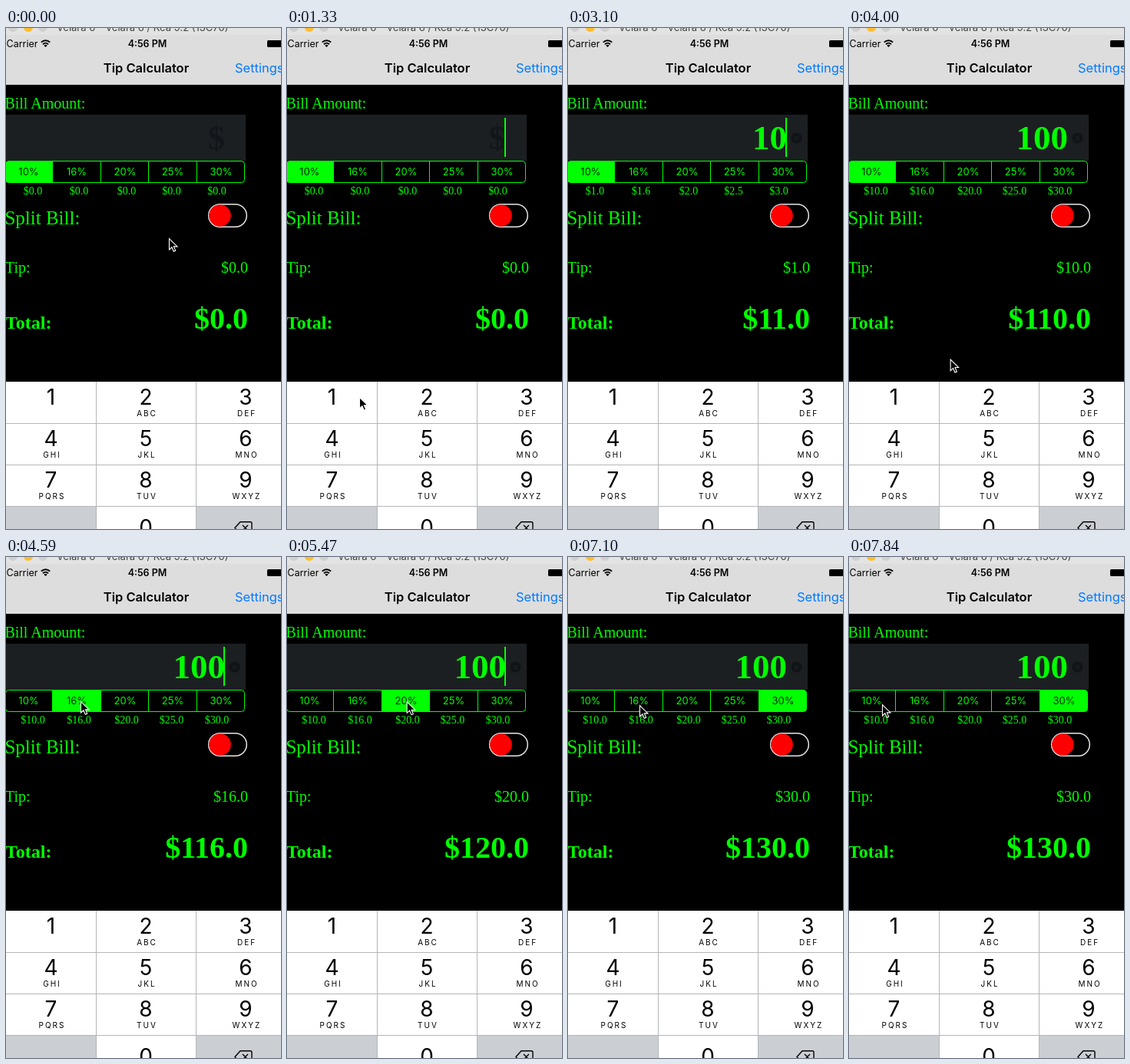
Animation of 358x653 px, one loop 7.99 s. Source, as an HTML page:

```html
<!DOCTYPE html>
<html lang="en">
<head>
<meta charset="utf-8">
<title>Tip Calculator</title>
<style>
  html, body { margin: 0; width: 358px; height: 653px; overflow: hidden; background: #000; }
  svg { display: block; }
  text { font-family: Inter, Roboto, sans-serif; }
  .serif { font-family: "Liberation Serif", "Times New Roman", serif; fill: #0f0; }
  .bold { font-weight: 700; }
  .semi { font-weight: 600; }
  .mid { text-anchor: middle; }
  .end { text-anchor: end; }
  .sub { letter-spacing: 2px; }
</style>
</head>
<body>
<svg id="stage" width="358" height="653" viewBox="0 0 358 653">
  <rect width="358" height="74" fill="#dddddd"/>
  <rect width="358" height="9" fill="#e3e3e3"/>
  <circle cx="9" cy="-1" r="6" fill="#cfcfcf"/>
  <circle cx="29" cy="-1" r="6" fill="#fdbd2f"/>
  <circle cx="48" cy="-1" r="6" fill="#cfcfcf"/>
  <text x="66" y="4" font-size="13" fill="#444">Velara 6 - Velara 6 / Kea 9.2 (13C70)</text>

  <text x="0.5" y="25" font-size="12.5">Carrier</text>
  <g fill="none" stroke="#000" stroke-width="1.9">
    <path d="M45.8 18.6A8 8 0 0 1 57.2 18.6"/>
    <path d="M48 21.2A5 5 0 0 1 55 21.2"/>
  </g>
  <path d="M51.5 25L49.3 22.8A3.2 3.2 0 0 1 53.7 22.8Z"/>
  <text class="semi mid" x="184" y="25" font-size="12.5">4:56 PM</text>
  <rect x="340" y="16" width="22" height="9" rx="1.5"/>
  <text class="semi mid" x="182.5" y="58" font-size="16.5">Tip Calculator</text>
  <text x="298" y="58" font-size="16.5" fill="#007aff">Settings</text>

  <text class="serif" x="-1.6" y="105" font-size="20">Bill Amount:</text>
  <rect y="113" width="312" height="60" fill="#1c1f22"/>
  <text id="hint" class="serif bold end" x="285" y="158" font-size="45" style="fill:#12161b">$</text>
  <text id="bill" class="serif bold end" x="285" y="158" font-size="45"></text>
  <g id="clear">
    <circle cx="297.5" cy="143.5" r="7" fill="#111417"/>
    <path d="M295 141l5 5m0-5l-5 5" stroke="#1c1f22" stroke-width="1.2"/>
  </g>
  <rect id="caret" x="283" y="117" width="2" height="51" fill="#0f0"/>

  <clipPath id="pill"><rect x="-.5" y="173.5" width="311" height="28" rx="4"/></clipPath>
  <rect id="pick" y="173" height="29" fill="#0f0" clip-path="url(#pill)"/>
  <rect x="-.5" y="173.5" width="311" height="28" rx="4" fill="none" stroke="#0f0"/>
  <path d="M60.5 174v27M123.5 174v27M185.5 174v27M248.5 174v27" stroke="#0f0"/>
  <g id="segments"></g>

  <text class="serif" x="-1.6" y="256" font-size="25">Split Bill:</text>
  <rect x="263.7" y="229.7" width="49.6" height="29.6" rx="14.8" fill="#000" stroke="#e8e8e8" stroke-width="1.5"/>
  <circle cx="278.5" cy="244.5" r="14.3" fill="#f00"/>
  <text class="serif" x="-1" y="319" font-size="20">Tip:</text>
  <text id="tip" class="serif end" x="315" y="319" font-size="20"></text>
  <text class="serif bold" x="-1" y="392" font-size="24">Total:</text>
  <text id="total" class="serif bold end" x="315" y="392" font-size="40"></text>

  <rect y="461" width="358" height="192" fill="#fff"/>
  <path d="M0 624h117v29H0zM248 624h110v29H248z" fill="#cbced3"/>
  <path d="M0 515.5h358M0 569.5h358M0 623.5h358M117.5 461v192M247.5 461v192" stroke="#b4b6b9"/>
  <g id="keys"></g>
  <path d="M298 651.5l7-7.7h13q2 0 2 2v11.400q0 2-2 2h-13zM308 648l7 7m0-7l-7 7" fill="none" stroke="#000" stroke-width="1.4"/>

  <path id="cursor" d="M.5 .5V15L3.900 11.800L6.300 17.300L8.700 16.300L6.400 10.900H11Z" stroke="#fff" stroke-width="1.1"/>
</svg>
<script>
const LOOP = 7990, STEPS = 54;
const RATES = [10, 16, 20, 25, 30];
const EDGES = [0, 61, 124, 186, 249, 311];
const SEG_X = [29.5, 92, 155, 217, 280];
const TIP_X = [35, 95, 157, 215.5, 274.5];

// [step, value]: held until the next entry
const BILLS = [[0, 0], [13, 1], [20, 10], [22, 100]];
const PICKS = [[0, 0], [30, 1], [36, 2], [42, 3], [45, 4]];

// [step, x, y]: pointer path, linear in between
const PATH = [
  [0, 212, 274], [3, 150, 318], [6, 58, 375], [8, 70, 385], [9, 94, 481],
  [11, 95, 488], [14, 95, 488], [16, 86, 560], [17, 125, 630], [18, 170, 662],
  [24, 170, 662], [25, 165, 635], [28, 115, 330], [30, 97, 188], [33, 97, 188],
  [36, 155, 188], [39, 157, 189], [41, 241, 193], [42, 241, 193], [45, 276, 190],
  [46, 276, 190], [48, 93, 193], [49, 73, 192], [50, 61, 192], [51, 61, 192],
  [52, 50, 192], [53, 43, 192], [54, 43, 192]
];

const $ = id => document.getElementById(id);

function addText(parent, x, y, size, text, cls) {
  const el = document.createElementNS('http://www.w3.org/2000/svg', 'text');
  el.setAttribute('x', x);
  el.setAttribute('y', y);
  el.setAttribute('font-size', size);
  el.setAttribute('class', cls);
  el.textContent = text;
  return parent.appendChild(el);
}

const segLabels = RATES.map((r, i) => addText($('segments'), SEG_X[i], 192, 13, r + '%', 'mid'));
const tipLabels = TIP_X.map(x => addText($('segments'), x, 217, 14, '', 'serif mid'));

const COLUMNS = [58.5, 182, 312];
['', 'ABC', 'DEF', 'GHI', 'JKL', 'MNO', 'PQRS', 'TUV', 'WXYZ'].forEach((letters, i) => {
  const x = COLUMNS[i % 3], y = 491 + 54 * Math.floor(i / 3);
  addText($('keys'), x, y, 28, i + 1, 'mid');
  addText($('keys'), x + 1.5, y + 15, 10, letters, 'mid sub');
});
addText($('keys'), 182, 661, 28, 0, 'mid');

const held = (list, step) => list.filter(([s]) => s <= step).pop()[1];
const money = v => '$' + (Number.isInteger(v) ? v + '.0' : v);
const show = (id, on) => $(id).setAttribute('visibility', on ? 'visible' : 'hidden');

function pointer(step) {
  const i = PATH.findIndex(([s]) => s > step);
  const [s0, x0, y0] = PATH[i - 1], [s1, x1, y1] = PATH[i];
  const k = (step - s0) / (s1 - s0);
  return [x0 + (x1 - x0) * k, y0 + (y1 - y0) * k];
}

function draw(step) {
  const bill = held(BILLS, step), pick = held(PICKS, step);
  const tip = bill * RATES[pick] / 100;

  $('bill').textContent = bill || '';
  show('hint', !bill);
  show('clear', bill);
  const blink = step % 7;
  show('caret', blink >= 1 && blink <= 3 || step === 20 || step === 21);

  $('pick').setAttribute('x', EDGES[pick] - 1);
  $('pick').setAttribute('width', EDGES[pick + 1] - EDGES[pick] + 1);
  segLabels.forEach((el, i) => el.setAttribute('fill', i === pick ? '#002800' : '#0f0'));
  tipLabels.forEach((el, i) => el.textContent = money(bill * RATES[i] / 100));
  $('tip').textContent = money(tip);
  $('total').textContent = money(bill + tip);
  $('cursor').setAttribute('transform', `translate(${pointer(step)})`);
}

const start = performance.now();
function tick() {
  const t = (performance.now() - start) % LOOP;
  // small lead absorbs the rounding of step times
  draw(Math.min(STEPS - 1, Math.floor((t + 8) * STEPS / LOOP)));
  requestAnimationFrame(tick);
}
tick();
</script>
</body>
</html>
```
